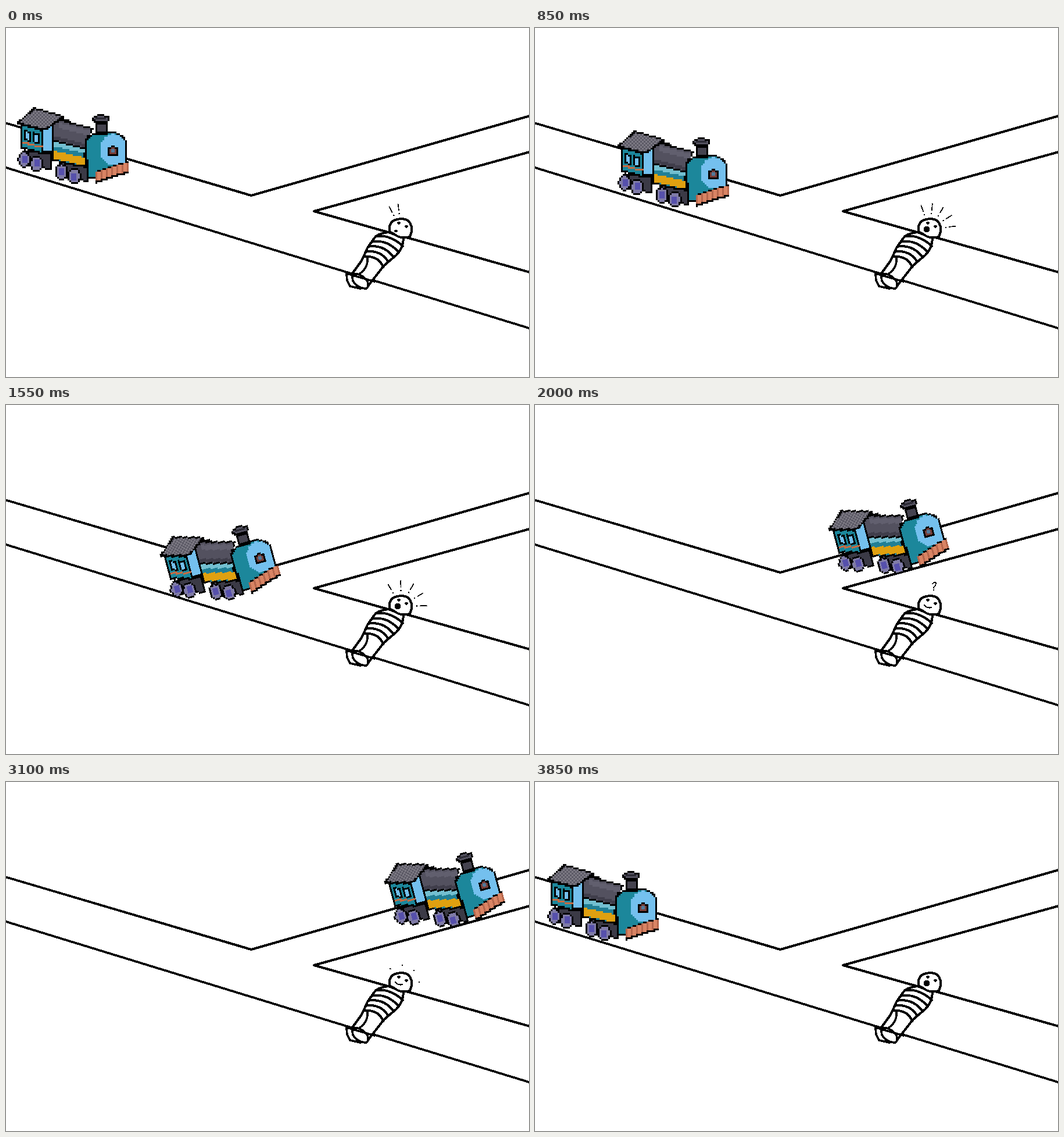
Animation of 900 by 600 pixels, one loop 3900 ms. Source, as an HTML page with a canvas:

```html
<!DOCTYPE html>
<html lang="en">
<head>
<meta charset="utf-8">
<title>Train at the fork</title>
<style>
html, body { margin: 0; width: 100%; height: 100%; overflow: hidden; background: #fff; }
canvas { display: block; }
</style>
</head>
<body>
<canvas id="stage" width="900" height="600"></canvas>
<script>
const LOOP = 3900, STEP = 50, CELL = 3;
const ctx = document.getElementById('stage').getContext('2d', { willReadFrequently: true });

function layer(w, h) {
  const c = document.createElement('canvas');
  c.width = w;
  c.height = h;
  return c.getContext('2d', { willReadFrequently: true });
}

function ink(g, d, width, fill) {
  const path = new Path2D(d);
  if (fill) { g.fillStyle = fill; g.fill(path); }
  g.lineWidth = width;
  g.lineCap = g.lineJoin = 'round';
  g.strokeStyle = '#000';
  g.stroke(path);
}

function dot(g, x, y, rx, ry = rx) {
  g.fillStyle = '#000';
  g.beginPath();
  g.ellipse(x, y, rx, ry, 0, 0, 7);
  g.fill();
}

// Snap soft edges to pure black or white for a hard pencil look.
function harden(g, x, y, w, h) {
  const img = g.getImageData(x, y, w, h), px = img.data;
  for (let i = 0; i < px.length; i += 4) {
    px[i] = px[i + 1] = px[i + 2] = px[i] < 128 ? 0 : 255;
  }
  g.putImageData(img, x, y);
}

// ---------- tracks and the tied-up figure ----------
function makeScene() {
  const g = layer(900, 600);
  g.fillStyle = '#fff';
  g.fillRect(0, 0, 900, 600);
  ink(g, 'M-5 162L422 288L905 150', 4);
  ink(g, 'M-5 238.5L905 517.5', 4);
  ink(g, 'M905 212L530 315L905 421', 4);

  ink(g, 'M658 351Q640 353 634 361L622 378L612 400L596 422L621 446L632 432L650 409L672 390Q684 378 684 361Z', 4, '#fff');
  for (let i = 0; i < 5; i++) {
    const x = 636 - 5.3 * i, y = 358 + 8.8 * i;
    ink(g, `M${x} ${y}Q${x + 25} ${y - 3} ${683 - 8.4 * i} ${375 + 9 * i}`, 4);
  }
  ink(g, 'M622 394Q624 412 608 423', 3.5);
  ink(g, 'M596 422L586 424L587 434L592 444L610 448Z', 3.5, '#fff');
  ink(g, 'M595 423Q610 420 621 434Q626 444 620 448Q605 448 597 435Z', 3.5, '#fff');
  ink(g, 'M586 422L634 436', 3.5);

  ink(g, 'M660 350Q658 337 667 331Q681 325 692 331Q700 340 698 350L695 359Q679 363 669 355Z', 4, '#fff');
  dot(g, 676, 335, 2.6);
  dot(g, 689, 341, 2.6);
  harden(g, 0, 0, 900, 600);
  return g.canvas;
}

// ---------- pixel train, measured in cells ----------
function makeTrain() {
  const cols = 65, rows = 45, g = layer(cols, rows);

  function part(color, d, outline) {
    const path = new Path2D(d);
    g.lineWidth = 1;
    for (let j = 0; j < rows; j++) {
      for (let i = 0; i < cols; i++) {
        const edge = outline && g.isPointInStroke(path, i + .5, j + .5);
        if (!edge && !g.isPointInPath(path, i + .5, j + .5)) continue;
        g.fillStyle = edge ? '#000' : typeof color === 'string' ? color : color(i, j);
        g.fillRect(i, j, 1, 1);
      }
    }
  }
  // Upright sides, top and bottom sloping by `drop`.
  const slab = (color, x, y, w, drop, h, outline) =>
    part(color, `M${x} ${y}l${w} ${drop}v${h}l${-w} ${-drop}Z`, outline);
  const oval = (color, x, y, rx, ry, outline) =>
    part(color, `M${x - rx} ${y}a${rx} ${ry} 0 1 0 ${2 * rx} 0a${rx} ${ry} 0 1 0 ${-2 * rx} 0Z`, outline);

  const teal = '#1c879b', sky = '#74c0ee', iron = '#3b3a46', steel = '#53515f';

  // cab
  part(sky, 'M14.5 13.5L26 6.5L28.5 7.5L21 11L20 26L14.5 26Z', true);
  slab(teal, 2.5, 10, 12, 3.3, 13, true);
  for (const k of [0, 1]) {
    slab('#000', 4 + 5 * k, 13 + 1.2 * k, 4, 1, 6);
    slab(sky, 5 + 5 * k, 14.3 + 1.2 * k, 2, .5, 4);
  }
  slab('#c66c43', 3, 20, 7, 1, 1);
  slab('#c66c43', 10.5, 22, 4.5, 0, 1);
  part((i, j) => (i + j) % 2 ? '#5b5965' : '#7d7a84', 'M.5 9L10 .7L26.5 5.3L16 13Z', true);

  // boiler and side bands
  slab('#217f95', 20.5, 19, 18.5, 4.7, 11, true);
  slab('#73bfd0', 21, 19.7, 18, 4, 2.7);
  slab('#dfa010', 21, 25, 18, 4, 4.5);
  part(steel, 'M20.5 10L25 7.5L43.5 12.5L40.5 17L39.5 24L20.5 19Z', true);
  slab('#615f6e', 24, 9, 18, 4.5, 3);
  slab('#403e4b', 21, 16.5, 18.5, 4.5, 2);

  // running gear
  slab(iron, 5, 25, 14.5, 2, 8.5, true);
  slab(iron, 24.5, 31.5, 16, 3, 8, true);
  for (const x of [4.2, 11.2, 25.5, 32.8]) {
    const y = 28.6 + .335 * x;
    oval('#7f7ba6', x, y, 3.3, 4.2, true);
    slab('#5650ac', x - 1.5, y - 2, 3, 0, 4);
  }

  // front
  part(teal, 'M39.7 19Q42 15 48 15L56 14.7Q62.6 16.5 62.6 22L62.6 32.7L49 39.7L40.3 40.3Z', true);
  part(sky, 'M55.5 15.3Q62 17 62 22L62 32L53 33.5Q47.5 30 47.5 24Q48.5 16.3 55.5 15.3Z');
  oval('#783d37', 55, 25.4, 3, 2.5, true);
  oval('#52799a', 55.2, 25.4, 1.3, 1.1);
  slab('#000', 45.5, 36.6, 18, -5.7, 7);
  slab(i => i % 3 ? '#d98464' : '#b5664c', 45, 37.3, 18.5, -5.7, 5);

  // chimney
  slab('#45434f', 45.3, 9, 6, 0, 6, true);
  oval(steel, 48.2, 6.8, 4.6, 2, true);
  slab('#2b2a34', 45.5, 6, 5.5, 0, 1);
  return g.canvas;
}

// ---------- motion ----------
const span = (t, a, b) => Math.min(1, Math.max(0, (t - a) / (b - a)));
const smooth = (t, a, b) => { const u = span(t, a, b); return u * u * (3 - 2 * u); };

// A steady roll with two surges, then a dash off to the right.
function pose(t) {
  if (t >= 3400) {
    const back = 220 * (1 - span(t, 3400, 3850)) ** 2;
    return [117.5 - back, 206.5 - .31 * back, 0];
  }
  const x = 115.5 + .0993 * t + 45 * smooth(t, 600, 925) + 286.6 * smooth(t, 1300, 2203) +
    110 * span(t, 3100, 3400) ** 2;
  // Both slopes joined by a rounded corner.
  const down = 205.5 + .35 * (x - 115.5), up = 231 - .292 * (x - 609);
  const y = (down + up) / 2 - Math.hypot((down - up) / 2, 25);
  return [x, y, -15 * smooth(t, 1350, 1550)];
}

function drawTrain(t) {
  const [x, y, tilt] = pose(t);
  ctx.save();
  ctx.imageSmoothingEnabled = false;
  ctx.translate(Math.round(x - .5), Math.round(y));
  ctx.rotate(tilt * Math.PI / 180);
  ctx.drawImage(train, -96, -66, train.width * CELL, train.height * CELL);
  ctx.restore();
}

// ---------- feelings ----------
// A fan of strokes shooting out from the head; p is the stroke's growth.
function rays(count, first, gap, base, p) {
  for (let i = 0; i < count; i++) {
    const a = (first + gap * i) * Math.PI / 180;
    const at = r => [680 + r * Math.cos(a), 346 + r * Math.sin(a)];
    dot(ctx, ...at(base), 1.2);
    if (p > .35) ink(ctx, `M${at(base + 17 * .35)}L${at(base + 17 * p)}`, 1.7);
  }
}

function question(t) {
  const q = Math.min(1.15, (t - 2000) / 350);
  const x = 684 + 10 * q, y = 305 - 11 * q, w = 6 + 9 * q, h = 13 + 7 * q;
  const at = (u, v) => `${x + u * w} ${y + v * h} `;
  ink(ctx, `M${at(0, .2)}Q${at(.5, -.15)}${at(.95, .05)}Q${at(1, .45)}${at(.4, .6)}L${at(.35, .75)}`, 1.8);
  dot(ctx, x + .33 * w, y + h, 1.2);
}

function drawFace(t) {
  if (t < 500) dot(ctx, 671, 349, 3, 2);
  else if (t < 1800 || t >= 3400) dot(ctx, 674, 346, 5.5);
  else ink(ctx, 'M670 344Q674 350 682 348', 2);

  if (t < 250) {
    rays(2, -118, 21, 27, 1 + t / 500);
  } else if (t >= 650 && t < 1800) {
    const beat = (t - 650) / (700 / 3), n = Math.floor(beat);
    rays(5, n % 2 ? -121 : -111, n % 2 ? 30 : 26, 27, (beat - n) / .857);
  } else if (t >= 1900 && t < 2750) {
    question(t);
  } else if (t >= 3100 && t < 3400) {
    rays(4, -127, 41, 31, (t - 3100) / 250);
  }
  harden(ctx, 640, 270, 110, 100);
}

const scene = makeScene(), train = makeTrain();
const start = performance.now();
let shown = -1;

function tick() {
  const t = Math.floor((performance.now() - start) % LOOP / STEP) * STEP;
  if (t !== shown) {
    shown = t;
    ctx.drawImage(scene, 0, 0);
    drawFace(t);
    drawTrain(t);
  }
  requestAnimationFrame(tick);
}
tick();
</script>
</body>
</html>
```
